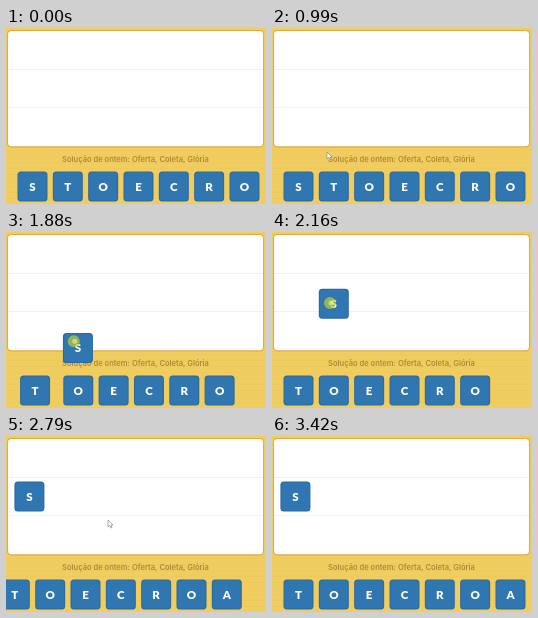
An HTML page with a canvas for the animation above (4.15 s loop, 260 by 176 pixels).

```html
<!DOCTYPE html>
<html lang="pt">
<head>
<meta charset="utf-8">
<style>
html, body { margin: 0; width: 100%; height: 100%; overflow: hidden; background: #f0cd60; }
canvas { display: block; width: 260px; height: 176px; }
</style>
</head>
<body>
<canvas id="stage"></canvas>
<script>
const W = 260, H = 176, LOOP = 4150;
const PITCH = 35.33, ROW_X = 11.5, ROW_Y = 143.6, SIZE = 30;
const ENTER = 590, GRAB = 1670, CARRIED = 2160, DROP = 2580, REFILL = 2790, EXIT = 3420;

const canvas = document.getElementById('stage');
const scale = window.devicePixelRatio || 1;
canvas.width = W * scale;
canvas.height = H * scale;
const g = canvas.getContext('2d');

// Legs are quadratic curves, each starting where the last one ended
const pointer = {
  start: [248, 165],
  legs: [
    { from: ENTER, to: 990, via: [140, 72], end: [55, 124] },
    { from: 990, to: 1200, via: [34, 128], end: [31, 158] },
    { from: GRAB, to: CARRIED, via: [96, 91], end: [58, 71] },
    { from: CARRIED, to: 2510, via: [38, 64], end: [21, 60] },
    { from: DROP, to: REFILL, via: [45, 68], end: [102, 84] },
    { from: REFILL, to: 3350, via: [190, 108], end: [252, 160] }
  ]
};
const dragged = {
  start: [ROW_X, ROW_Y],
  legs: [
    { from: GRAB, to: CARRIED, via: [91, 89], end: [46.8, 56.7] },
    { from: CARRIED, to: 2510, via: [26, 50], end: [8.4, 45.5] }
  ]
};

const progress = (t, from, length) => Math.min(1, Math.max(0, (t - from) / length));
const remaining = (t, from, length) => Math.pow(1 - progress(t, from, length), 3);

function place({ start, legs }, t) {
  return legs.reduce((p, leg) => {
    const k = progress(t, leg.from, leg.to - leg.from), m = 1 - k;
    return p.map((v, i) => m * m * v + 2 * m * k * leg.via[i] + k * k * leg.end[i]);
  }, start);
}

function step(t) {
  if (t < ENTER) return 0;
  const [from, size] = t < GRAB ? [ENTER, 200 / 3] : [GRAB, 70];
  return from + Math.floor((t - from) / size + 0.01) * size;
}

function box(x, y, w, h, r, fill) {
  g.beginPath();
  g.roundRect(x, y, w, h, r);
  g.fillStyle = fill;
  g.fill();
}

function label(text, x, y, font, color) {
  g.font = font;
  g.fillStyle = color;
  g.textAlign = 'center';
  g.fillText(text, x, y);
}

function tile(letter, x, y, alpha = 1) {
  g.globalAlpha = alpha;
  box(x, y, SIZE, SIZE, 3.5, '#286aa3');
  box(x + 1, y + 1, SIZE - 2, SIZE - 2, 3, '#3076b0');
  g.globalAlpha = 1;
  label(letter, x + SIZE / 2, y + 19.2, '900 11.5px Lato, sans-serif', '#fff');
}

function arrow(x, y) {
  g.beginPath();
  [[0, 0], [0, 7], [1.7, 5.5], [2.9, 8], [4, 7.5], [2.9, 5], [5, 5]]
    .forEach(([dx, dy]) => g.lineTo(x + dx, y + dy));
  g.closePath();
  g.fillStyle = '#fff';
  g.fill();
  g.strokeStyle = '#888';
  g.lineWidth = 0.7;
  g.stroke();
}

function disc(x, y, r, color) {
  g.beginPath();
  g.arc(x, y, r, 0, Math.PI * 2);
  g.fillStyle = color;
  g.fill();
}

function board() {
  g.fillStyle = '#f0cd60';
  g.fillRect(0, 0, W, H);
  g.fillStyle = 'rgba(222,170,60,.1)';
  for (let y = 2; y < H; y += 6) g.fillRect(0, y, W, 1);
  box(1, 2, 257, 117.5, 4.5, '#dfaa48');
  box(2, 3, 255, 115.3, 3.5, '#fff');
  g.fillStyle = '#f1f1f1';
  g.fillRect(2, 41, 255, 1);
  g.fillRect(2, 79, 255, 1);
  label('Solução de ontem: Oferta, Coleta, Glória', 129.5, 134.3,
    '600 7.55px Inter, sans-serif', '#b08a38');
}

function row(t) {
  const letters = [...'TOECRO'];
  let slide = 0;
  if (t >= REFILL) {
    letters.push('A');
    slide = -PITCH / 2 * remaining(t, REFILL, 400);
  }
  letters.forEach((c, i) => {
    const shift = PITCH * remaining(t, i ? 1800 : 1740, 240);
    tile(c, ROW_X + i * PITCH + shift + slide, ROW_Y);
  });
}

function draw(t) {
  g.setTransform(scale, 0, 0, scale, 0, 0);
  board();
  row(t);
  tile('S', ...place(dragged, t), t >= 1130 && t <= GRAB ? 0.8 : 1);
  if (t < ENTER || t >= EXIT) return;
  const [x, y] = place(pointer, t);
  if (t >= GRAB && t < DROP) {
    disc(x, y, 6, 'rgba(190,205,45,.7)');
    disc(x + 1, y, 2.5, 'rgba(255,255,210,.5)');
  } else {
    arrow(x, y);
  }
}

const start = performance.now();
function frame() {
  draw(step((performance.now() - start) % LOOP));
  requestAnimationFrame(frame);
}
frame();
</script>
</body>
</html>
```
